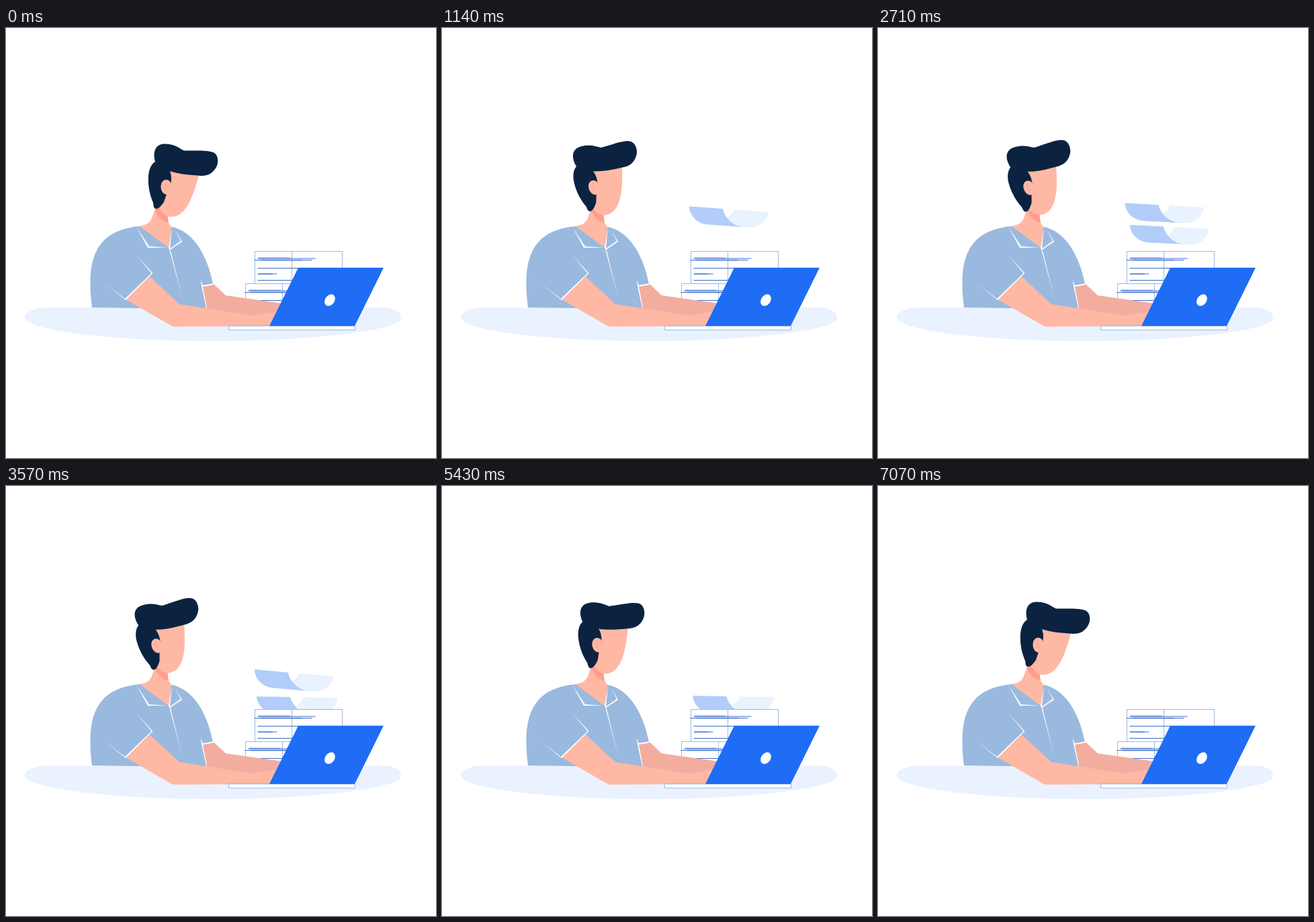
An HTML page that plays this animation: 640x640 px, repeating every 7210 ms.

```html
<!DOCTYPE html>
<html lang="en">
<head>
<meta charset="utf-8">
<title>Desk work</title>
<style>
  html, body { margin: 0; width: 100%; height: 100%; overflow: hidden; background: #fff; }
  svg { display: block; width: 100%; height: 100%; }
  .skin { fill: #ffb8a4; }
  .shade { fill: #ff9d8c; }
  .shirt { fill: #9ab9df; }
  .hair { fill: #0b2341; }
  .box { fill: #fff; stroke: #9ab9df; }
  .note { fill: none; stroke: #3a6cca; }
  .fold { fill: #b2cdfa; }
  .leaf { fill: #e9f2ff; }
  .white { fill: #fff; }
</style>
</head>
<body>
<svg viewBox="0 0 640 640">
  <defs>
    <path id="leaf" class="leaf" d="M8 0H59C57 15 47 25 29 25H27C17 25 5 20 -2 13C3 10 6 5 8 0Z"/>
    <path id="fold" class="fold" d="M-59 0H-9C-5 13 7 25 27 25H-29C-47 25 -58 12 -59 0Z"/>
    <g id="folder">
      <path class="box" d="M0 0H130V48H0ZM55 0V48"/>
      <path class="note" d="M4 10.500H90M-1 13H85M4 25H74M4 33.500H33M4 43H64"/>
      <path class="note" stroke-width="2" opacity=".5" d="M5 10H52M8 13H70M5 33.500H26"/>
    </g>
  </defs>

  <path fill="#eaf2ff" d="M63 416H560C578 416 588 423 588 432C588 450 450 466 310 466C170 466 28 452 28 430C28 422 45 416 63 416Z"/>

  <g class="sheet"><use href="#leaf"/><use href="#fold"/></g>
  <g class="sheet"><use href="#leaf"/><use href="#fold"/></g>

  <use href="#folder" x="356.500" y="380.500"/>
  <use href="#folder" x="370.500" y="332.500"/>

  <!-- body -->
  <path class="shirt" d="M128 416C118 340 136 300 200 295L247 296C280 303 300 340 308 381L300 420L204 417Z"/>
  <path class="skin" d="M223 266L217 283C213 292 207 293 199 295L243 328L246 296L241 288L240 266Z"/>
  <path class="shade" d="M222 271C227 283 233 288 242 290L240 276L230 264Z"/>
  <path fill="#f2ad9f" d="M291 384L309 381L327 398L412 410L405 424L368 430L299 418Z"/>
  <path class="skin" d="M214 370L258 411L368 428L405 421L394 443.500L252 444.500Q248 444.500 244 442L178 404Z"/>
  <path class="white" d="M194 296L213 325L241 327L211 327ZM247 297L244 329L242 328ZM252 301L262 318L243 331V329L260 317ZM243.500 331L262.500 402L245 331ZM194 338L218.500 365L178 405L147 380L177 403L216.500 365ZM290 375L293 383L309 380V382L293 385L299 417H298L291 384Z"/>

  <g id="head">
    <path class="skin" d="M240 206L287 219C279 250 268 281 246 281C237 281 231 274 226 264Z"/>
    <path class="hair" d="M222 199C218 185 222 172 237 172.500C252 173 258 179 265 182.500C290 182.500 300 182 308 185C316 188 317 199 313 207C308 216 301 220 291 220C275 219 258 218 244 213C247 220 246 229 245 232L239 247L235 259C230 266 227 269 223 269C219 268 220 264 219 260C214 249 211 235 212 220C213 209 217 202 222 199Z"/>
    <path class="skin" d="M245 230C240 222 230 226 230.500 237C231 244 235 248 240 248L246 244Z"/>
    <path fill="none" stroke="#ff9d8c" d="M239 229q-5 6 0 13"/>
  </g>

  <!-- laptop -->
  <path class="box" d="M331.500 443.500H519.500V449.500H331.500Z"/>
  <path fill="#1f6cf5" d="M435 356.800H562L519 443.500H392Z"/>
  <ellipse class="white" cx="482" cy="405" rx="7" ry="9.500" transform="rotate(35 482 405)"/>
</svg>
<script>
const LOOP = 7210, STEP = 71.4;
const LOOK = 1750, LOOK_END = 5940;             // head turn: duration, time it is back
const DELAY = 1900, FALL = 4540, SWAY = 3680;   // sheets: spacing, fall time, sway period

const sheets = document.querySelectorAll('.sheet');
const head = document.getElementById('head');
const clamp = v => Math.max(0, Math.min(1, v));
const easeOut = p => 1 - (1 - p) ** 2;

// A sheet drifts down steadily while it rocks from side to side
function drawSheet(sheet, age) {
  const shown = age >= 0 && age < FALL;
  sheet.setAttribute('opacity', shown ? clamp(age / 760) : 0);
  if (!shown) return;
  const phase = 2 * Math.PI * (age + 130) / SWAY;
  const tilt = 3 - 2 * Math.cos(phase);
  const x = 426 + .0017 * age - .0012 * age * Math.sin(phase);
  const y = 246.3 + .019 * age + 2 * Math.sin(phase);
  sheet.setAttribute('transform', `translate(${x} ${y}) rotate(${tilt})`);
  // The right half slides out near the end
  sheet.firstChild.setAttribute('x', Math.max(0, age - 2890) * .004);
}

function draw(t) {
  // The head looks up, holds, then mirrors the move back
  const look = easeOut(clamp(Math.min(t, LOOK_END - t) / LOOK));
  head.setAttribute('transform', `rotate(${-18.5 * look} 235.4 279.3)`);
  sheets.forEach((sheet, i) => drawSheet(sheet, t - i * DELAY));
}

const begin = performance.now();
function tick(now) {
  const t = Math.max(0, now - begin) % LOOP;
  draw(Math.floor((t + 5) / STEP) * STEP);
  requestAnimationFrame(tick);
}
draw(0);
requestAnimationFrame(tick);
</script>
</body>
</html>
```
